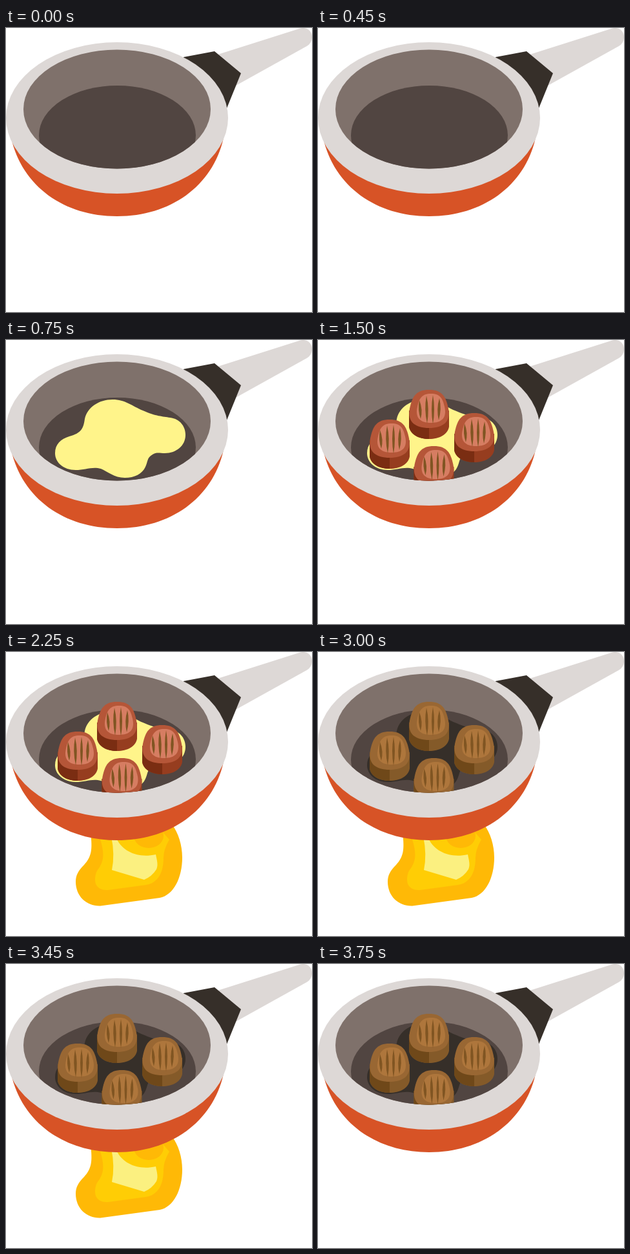
These frames come from a looping animation (474x439 px, 4500 ms). An HTML page:

```html
<!DOCTYPE html>
<html lang="en">
<head>
<meta charset="utf-8">
<title>Frying pan</title>
<style>
  html, body { margin: 0; width: 100%; height: 100%; overflow: hidden; background: #fff; }
  svg { display: block; width: 100vw; height: 100vh; }
  #food { --top: #b55638; --face: #d67d62; --side: #963d1f; --shade: #7a2d12; }
  #food.cooked { --top: #996733; --face: #ae763c; --side: #845a29; --shade: #6f4819; }
  #food:not(.cooked) .grill { visibility: hidden; }
</style>
</head>
<body>
<svg viewBox="0 0 474 439">
  <defs>
    <clipPath id="inside"><ellipse cx="172" cy="125.5" rx="145" ry="92"/></clipPath>
    <!-- one piece, origin at the middle of its top edge -->
    <g id="piece">
      <path fill="var(--side)" d="M-31 32V57C-29 69-16 76 0 76S29 69 31 57V32Z"/>
      <path fill="var(--shade)" d="M-31 32V57C-29 69-16 76 0 76V50Z"/>
      <path fill="var(--top)" d="M0 0C20 0 26 10 30 29C34 50 21 59 0 59S-34 50-30 29C-26 10-20 0 0 0Z"/>
      <path fill="var(--face)" d="M3 6C17 6 21 13 24 26C28 43 20 51 3 51S-22 43-18 26C-15 13-11 6 3 6Z"/>
      <path class="grill" fill="#805522" d="M-15 16Q-9 31-13 45Q-18 31-15 16ZM-4 9Q1 30-3 52Q-8 30-4 9ZM6 8Q10 30 6 53Q2 30 6 8ZM16 13Q20 29 15 47Q11 30 16 13Z"/>
    </g>
  </defs>

  <g id="flame">
    <path fill="#ffb906" d="M131 280C134 304 133 316 121 329C112 338 108 345 108 355C108 378 125 393 146 392.500L238 380C260 376 273 348 273 318C273 298 267 280 257 266Z"/>
    <path fill="#ffcd05" d="M143 280C150 302 155 318 144 334C139 340 138 346 138 353C138 363 147 369 158 368L217 360C236 357 244 340 244 318Q244 305 253 290L240 275Z"/>
    <ellipse cx="221" cy="284" rx="23" ry="19" fill="#ffb906"/>
    <path fill="#fbf080" d="M163 285L172 290C182 309 205 319 232 313C234 323 236 329 233 336Q226 347 214 352L164 337Q169 313 163 285Z"/>
  </g>

  <path fill="#ddd8d6" d="M328 41L456 .5C465-2 474 4 474 14C474 20 471 25 466 28L356 89Z"/>
  <path fill="#362f29" d="M275 45L323 36L364 70L342 124L280 110Z"/>
  <path fill="#d75326" d="M8 170C25 245 90 291 172 291S320 245 337 170Z"/>
  <ellipse cx="172" cy="139" rx="172" ry="117" fill="#ddd8d6"/>
  <g clip-path="url(#inside)">
    <rect x="27" y="33" width="290" height="185" fill="#7f716b"/>
    <ellipse cx="172.500" cy="166" rx="121.500" ry="77" fill="#514541"/>
    <path id="oil" d="M165 92C185 92 195 102 212 109C232 118 243 118 254 120C270 122 278 134 278 147C278 163 264 175 246 175C238 175 233 173 227 177C218 182 220 188 216 196C211 207 199 213 184 213C168 213 157 203 147 199C134 195 122 201 108 201C89 201 76 189 76 175C76 161 85 153 98 149C117 144 120 136 122 122C126 104 144 92 165 92Z"/>
    <g id="food">
      <use href="#piece" x="172" y="77"/>
      <use href="#piece" x="111" y="123"/>
      <use href="#piece" x="242" y="113"/>
      <use href="#piece" x="179.500" y="164"/>
    </g>
  </g>
</svg>
<script>
  const STEP = 750, STEPS = 6;
  const [flame, oil, food] = ["flame", "oil", "food"].map(id => document.getElementById(id));
  const show = (el, on) => { el.style.display = on ? "" : "none"; };

  function draw() {
    const step = Math.floor(performance.now() / STEP) % STEPS;
    const cooked = step >= 4;
    show(oil, step >= 1);
    show(food, step >= 2);
    show(flame, step === 3 || step === 4);
    oil.setAttribute("fill", cooked ? "#362f29" : "#fff48a");
    food.classList.toggle("cooked", cooked);
    requestAnimationFrame(draw);
  }
  draw();
</script>
</body>
</html>
```
